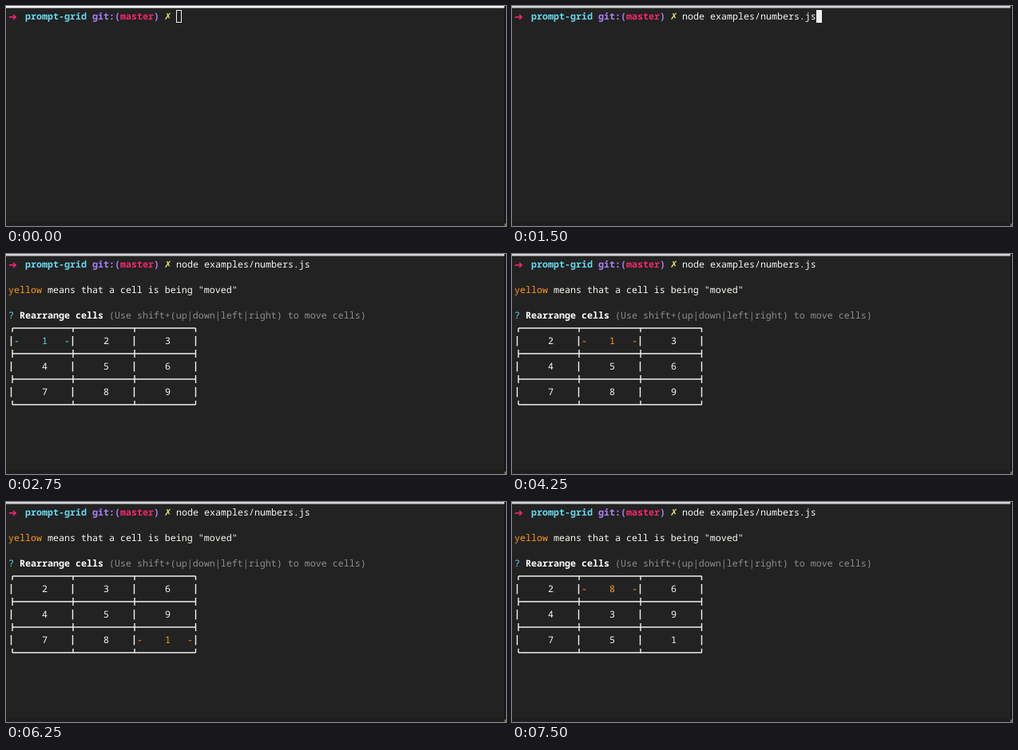
Animation of 626x276 px, one loop 8 s. Source, as an HTML page:

```html
<!DOCTYPE html>
<html lang="en">
<head>
<meta charset="utf-8">
<title>Terminal grid prompt</title>
<style>
  html, body { margin: 0; width: 100%; height: 100%; overflow: hidden; background: #222; }
  svg { display: block; }
  text {
    font: 11.667px "Noto Sans Mono", "DejaVu Sans Mono", monospace;
    fill: #f8f8f2;
    white-space: pre;
    text-rendering: geometricPrecision;
  }
  .bold { font-weight: 600; }
  .strong { font-weight: 700; fill: #fff; }
  .sign { font-family: "DejaVu Sans", sans-serif; }
  .pink { fill: #f92672; }
  .cyan { fill: #66d9ef; }
  .purple { fill: #ae81ff; }
  .yellow { fill: #e6db74; }
  .orange { fill: #fd971f; }
  .gray { fill: #8d8d8b; }
  #lines { fill: none; stroke: #f0f0ec; stroke-width: 1.4; }
</style>
</head>
<body>
<svg width="626" height="276" viewBox="0 0 626 276">
  <rect width="626" height="276" fill="#222"/>
  <rect y="271" width="626" height="5" fill="#1f1f1f"/>
  <rect x="624" width="2" height="276" fill="#161616"/>
  <rect x="624" y="273" width="2" height="3" fill="#6b6a50"/>
  <rect id="bar" width="624" height="2.5"/>

  <text class="sign pink" x="3" y="17.5" style="font-size:13px">➜</text>
  <text class="bold cyan" x="24" y="17">prompt-grid</text>
  <text class="bold purple" x="108" y="17">git:(<tspan class="pink">master</tspan>)</text>
  <text class="sign yellow" x="198" y="17" style="font-size:11.5px">✗</text>
  <text id="command" x="213" y="17">node examples/numbers.js</text>
  <rect id="cursor" width="6" height="15" stroke="#f0f0ec"/>

  <g id="prompt">
    <text x="3" y="49"><tspan class="orange">yellow</tspan> means that a cell is being "moved"</text>
    <text x="3" y="81"><tspan class="cyan">?</tspan> <tspan class="strong">Rearrange cells</tspan> <tspan class="gray">(Use shift+(up|down|left|right) to move cells)</tspan></text>
    <path id="lines"/>
    <g id="cells"></g>
  </g>

  <path id="pointer" d="M521.6 46v14.6l3.3-3.1 2.4 5.7 2.6-1.1-2.4-5.6h4.7z"
        fill="#000" stroke="#fff" stroke-width="1.1"/>
</svg>
<script>
const LOOP = 8000;
const $ = id => document.getElementById(id);

// start time, board, selected cell, colour of the selection
const moves = [
  [2750, "123456789", 0, "cyan"],
  [4250, "213456789", 1, "orange"],
  [4750, "231456789", 2, "orange"],
  [5500, "236451789", 5, "orange"],
  [6250, "236459781", 8, "orange"],
  [6750, "236459781", 7, "cyan"],
  [7250, "236489751", 4, "orange"],
  [7500, "286439751", 1, "orange"]
];

function gridPath() {
  const joints = [8, 84, 161, 237.5];
  let d = "";
  for (let row = 0; row < 4; row++) {
    const y = 93 + row * 32;
    const top = row > 0 ? y - 5 : y;
    const bottom = row < 3 ? y + 5 : y;
    d += `M8 ${y}H237.5`;
    joints.forEach((x, col) => {
      d += `M${x} ${top}V${bottom}`;
      if (row < 3) d += `M${6.5 + col * 77} ${y + 10}v12.5`;
    });
  }
  return d;
}

function drawBoard([, board, selected, color]) {
  const put = (x, y, s, cls) => `<text x="${x}" y="${y}" class="${cls}">${s}</text>`;
  $("cells").innerHTML = [...board].map((digit, i) => {
    const x = 10 + i % 3 * 77;
    const y = 113 + Math.floor(i / 3) * 32;
    if (i !== selected) return put(x + 35, y, digit, "");
    return put(x, y, "-", color) + put(x + 35, y, digit, color) + put(x + 63, y, "-", color);
  }).join("");
}

function show(id, on) {
  $(id).style.visibility = on ? "visible" : "hidden";
}

let current = null;

function render(t) {
  const focused = t >= 500;
  $("bar").setAttribute("fill", focused ? "#d2d2d2" : "#f8f8f8");

  const [x, y] = t < 1500 ? [213, 5] : t < 2500 ? [381, 5] : [3, 21];
  $("cursor").setAttribute("x", x + 0.5);
  $("cursor").setAttribute("y", y + 0.5);
  $("cursor").setAttribute("fill", focused ? "#f0f0ec" : "none");

  show("pointer", t >= 250 && t < 1000);
  show("command", t >= 1500);
  show("cursor", t < 2750);
  show("prompt", t >= 2750);

  const move = moves.filter(m => m[0] <= t).pop();
  if (move && move !== current) drawBoard(move);
  current = move;
}

function tick() {
  render(performance.now() % LOOP);
  requestAnimationFrame(tick);
}

$("lines").setAttribute("d", gridPath());
tick();
</script>
</body>
</html>
```
